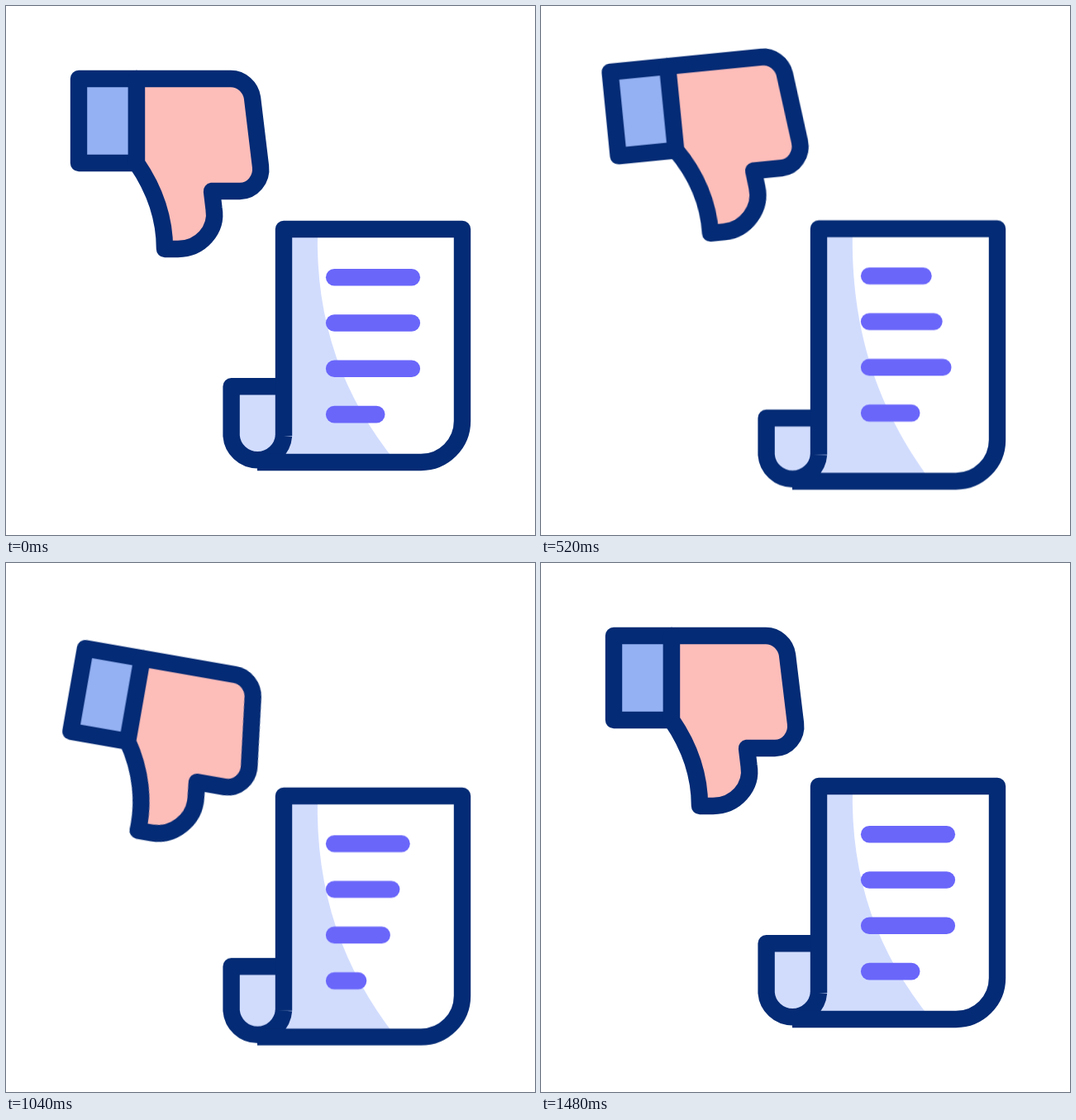
Recreate the animation shown at these times as an HTML page. Size 640 px wide and 640 px high, loop 1600 ms.

```html
<!DOCTYPE html>
<html lang="en">
<head>
<meta charset="utf-8">
<title>Thumb down on a document</title>
<style>
  html, body { margin: 0; height: 100%; overflow: hidden; background: #fff; }
  svg { display: block; width: 100vw; height: 100vh; }

  .ink { stroke: #042b75; stroke-width: 20.4; stroke-linejoin: round; }
  .anim { animation: 1600ms cubic-bezier(.333, 0, .667, 1) infinite; }

  .hand { transform-origin: 88px 139px; animation-name: swing; }
  .thumb { animation-name: bend; }
  .doc { animation-name: float; }
  .shade { animation-name: shade; }
  .tab { animation-name: tab; }
  .sheet { animation-name: sheet; }
  .lines { animation-name: lift; stroke: #6a66fa; stroke-width: 20.6; stroke-linecap: round; }
  .line { animation-name: cut; animation-delay: var(--lag, 0ms); stroke-dasharray: 93.6 300; --cut: 43.8px; }
  .line.short { stroke-dasharray: 51 300; --cut: 22.5px; }

  @keyframes swing {
    0%, 2.5% { transform: translate(0, 0) rotate(0deg); }
    27.5%, 30% { transform: translate(.6px, -9.1px) rotate(-6.2deg); }
    55% { transform: translate(-1.2px, 19.2px) rotate(13.1deg); }
    86.25%, 100% { transform: translate(0, 0) rotate(0deg); }
  }
  @keyframes bend {
    0%, 27.5%, 72.5%, 100% { d: path("M158 190C180 222 192 258 192 294H208C235 294 256 271 251.5 245L249 224H283C298 224 310 210 308 194L298 111C296 98 285 88 272 88H158Z"); }
    47.5% { d: path("M158 190C180 222 185 262 177 294H197C222 294 246 266 249.5 238L249 224H283C298 224 310 210 308 194L298 111C296 98 285 88 272 88H158Z"); }
  }
  @keyframes float {
    0% { transform: translateY(0); }
    18.75% { transform: translateY(1.8px); }
    42.5% { transform: translateY(-2px); }
    71.875% { transform: translateY(14px); }
    92.5%, 100% { transform: translateY(0); }
  }

  /* The sheet stretches while its curl rolls up. */
  @keyframes shade {
    0%, 15%, 73.125%, 100% { d: path("M336 270H377C374 383 408 473 472 552H336Z"); }
    43.75%, 49.375% { d: path("M336 270H377C374 397.2 408 498.6 472 587.5H336Z"); }
  }
  @keyframes tab {
    0%, 15%, 73.125%, 100% { d: path("M336 520A31.8 31.8 0 0 1 272.6 520V460.3H336"); }
    43.75%, 49.375% { d: path("M336 555.5A31.8 31.8 0 0 1 272.6 555.5V519H336"); }
  }
  @keyframes sheet {
    0%, 15%, 73.125%, 100% { d: path("M304 552H502A50 50 0 0 0 552 502V270H336V520"); }
    43.75%, 49.375% { d: path("M304 587.5H502A50 50 0 0 0 552 537.5V270H336V555.5"); }
  }
  @keyframes lift {
    0%, 15%, 73.125%, 100% { transform: translateY(0); }
    43.75%, 49.375% { transform: translateY(-1.7px); }
  }
  @keyframes cut {
    0%, 17.5%, 74.06%, 100% { stroke-dashoffset: 0px; }
    42.5%, 48.125% { stroke-dashoffset: var(--cut); }
  }
</style>
</head>
<body>
<svg viewBox="0 0 640 640" fill="none">
  <g class="hand anim">
    <path class="ink" fill="#94b1f3" d="M88 88H158V190H88Z"/>
    <path class="ink thumb anim" fill="#fdbdb9" d="M158 190C180 222 192 258 192 294H208C235 294 256 271 251.5 245L249 224H283C298 224 310 210 308 194L298 111C296 98 285 88 272 88H158Z"/>
  </g>
  <g class="doc anim">
    <path class="shade anim" fill="#d1dcfd" d="M336 270H377C374 383 408 473 472 552H336Z"/>
    <path class="ink tab anim" fill="#d1dcfd" d="M336 520A31.8 31.8 0 0 1 272.6 520V460.3H336"/>
    <path class="ink sheet anim" d="M304 552H502A50 50 0 0 0 552 502V270H336V520"/>
    <g class="lines anim">
      <path class="line anim" d="M397.2 328.2h93.6"/>
      <path class="line anim" style="--lag: 80ms" d="M397.2 383.5h93.6"/>
      <path class="line anim" style="--lag: 160ms" d="M397.2 438.8h93.6"/>
      <path class="line short anim" style="--lag: 240ms" d="M397.2 494.1h51"/>
    </g>
  </g>
</svg>
<script>
  // Hold each pose for 40 ms, which eased keyframes cannot do alone.
  const STEP = 40, LOOP = 1600;
  const anims = document.getAnimations();
  anims.forEach(a => a.pause());

  function tick(now) {
    const t = Math.floor((now + .5) / STEP) * STEP % LOOP;
    anims.forEach(a => { a.currentTime = t; });
    requestAnimationFrame(tick);
  }
  tick(performance.now());
</script>
</body>
</html>
```
